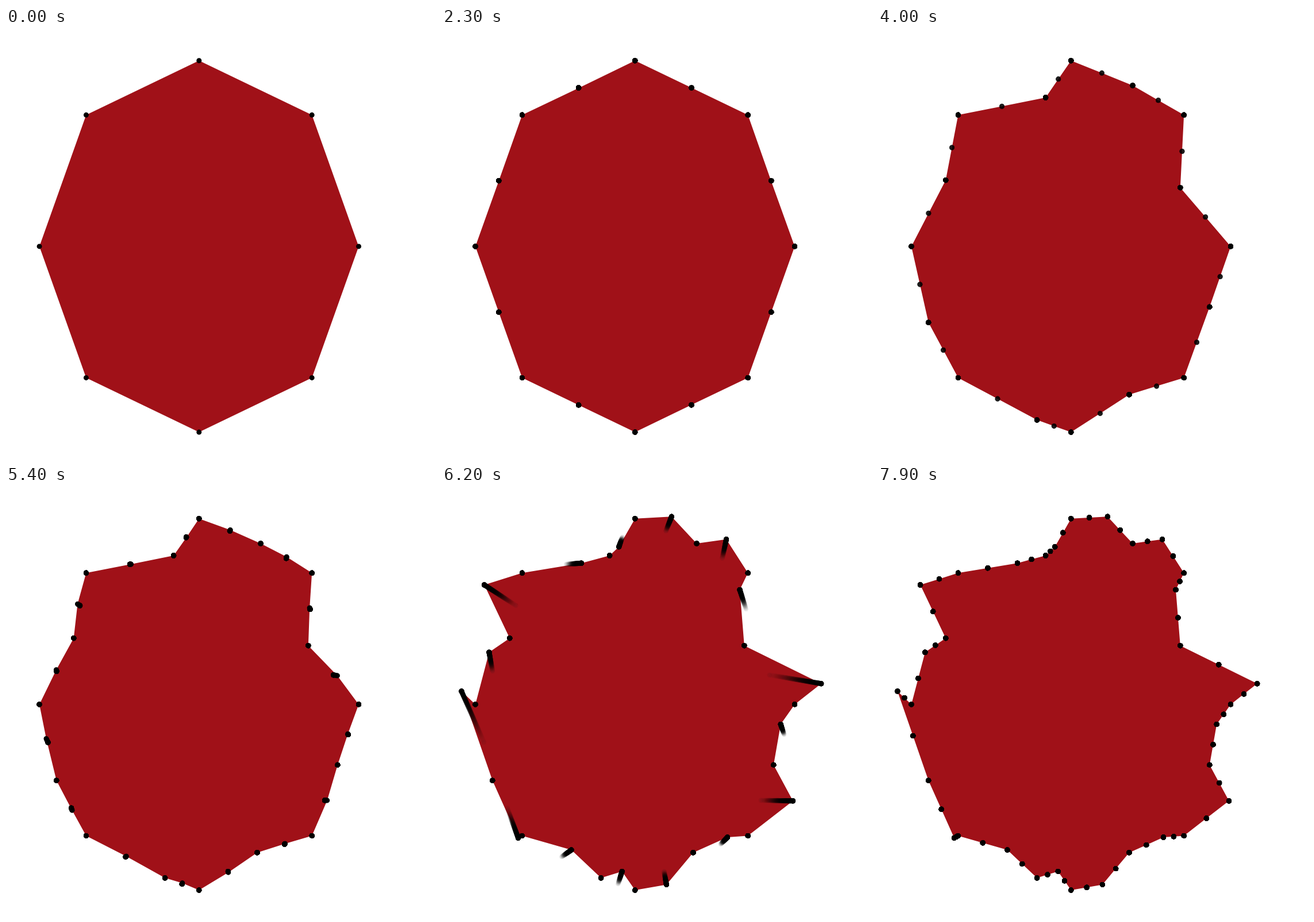
Recreate the animation shown at these times as an HTML page with a canvas. Size 748 by 748 pixels, loop 8000 ms.

```html
<!DOCTYPE html>
<html lang="en">
<head>
<meta charset="utf-8">
<title>Polygon subdivision</title>
<style>
html, body { margin: 0; width: 100%; height: 100%; overflow: hidden; background: #fff; }
canvas { display: block; width: 748px; height: 748px; }
</style>
</head>
<body>
<canvas id="stage" width="748" height="748"></canvas>
<script>
const ctx = document.getElementById('stage').getContext('2d');
const LOOP = 8000, START = 500;
const PHASE = 762.5;           // fade, rest, move, rest
const FIRST_MOVE = 2294;
const WAKE = 1080, STEP = 10;  // trail length and spacing in ms
const RADIUS = 4.5;

// How far each new midpoint is pushed (dx, dy), clockwise from the top
const pushes = [
  [[9, -4], [-47, 12], [4, -9], [3, -18], [39, 26], [-11, 18], [19, -1], [54, 17]],
  [[10, -25], [7, -33], [-11, -34], [90, 15], [-6, -18], [56, 1], [12, -12], [4, 23],
   [7, -22], [17, -12], [19, 52], [-39, -89], [-6, -33], [-55, -36], [27, -2], [-6, 17]],
  []
];

const clamp = v => Math.max(0, Math.min(1, v));
const weave = (a, b) => a.flatMap((p, i) => [p, b[i]]);
const midpoints = ring => ring.map(([x, y], i) => {
  const [nx, ny] = ring[(i + 1) % ring.length];
  return [(x + nx) / 2, (y + ny) / 2];
});

const octagon = Array.from({ length: 8 }, (_, i) => {
  const a = i * Math.PI / 4;
  return [335.8 + 277.7 * Math.sin(a), 379.9 - 323.2 * Math.cos(a)];
});

function pointsAt(round, t) {
  const u = clamp((t - round.move) / PHASE);
  return round.from.map(([x, y], i) => {
    const [dx, dy] = round.push[i] || [0, 0];
    return [x + dx * u, y + dy * u];
  });
}

let ring = octagon;
const rounds = pushes.map((push, k) => {
  const move = FIRST_MOVE + k * 4 * PHASE;
  const round = { push, move, fade: move - 2 * PHASE, from: midpoints(ring) };
  ring = weave(ring, pointsAt(round, Infinity));
  return round;
});

function drawShape(t) {
  let outline = octagon;
  for (const r of rounds) {
    if (t >= r.fade) outline = weave(outline, pointsAt(r, t));
  }
  ctx.fillStyle = '#a01118';
  ctx.beginPath();
  for (const [x, y] of outline) ctx.lineTo(x, y);
  ctx.fill();
}

function drawDots(points, alpha) {
  if (alpha < 0.001) return;
  ctx.globalAlpha = alpha;
  ctx.beginPath();
  for (const [x, y] of points) {
    ctx.moveTo(x + RADIUS, y);
    ctx.arc(x, y, RADIUS, 0, 2 * Math.PI);
  }
  ctx.fill();
}

function draw(t) {
  ctx.globalAlpha = 1;
  ctx.clearRect(0, 0, 748, 748);
  drawShape(t);
  ctx.fillStyle = '#000';
  for (let age = WAKE; age >= 0; age -= STEP) {
    const past = t - age;
    if (age > 0 && past < START) continue;
    const strength = (1 - age / WAKE) ** 3;
    drawDots(octagon, strength);
    for (const r of rounds) {
      drawDots(pointsAt(r, past), strength * clamp((past - r.fade) / PHASE));
    }
  }
}

const begin = performance.now();
function tick() {
  draw((performance.now() - begin) % LOOP);
  requestAnimationFrame(tick);
}
tick();
</script>
</body>
</html>
```
